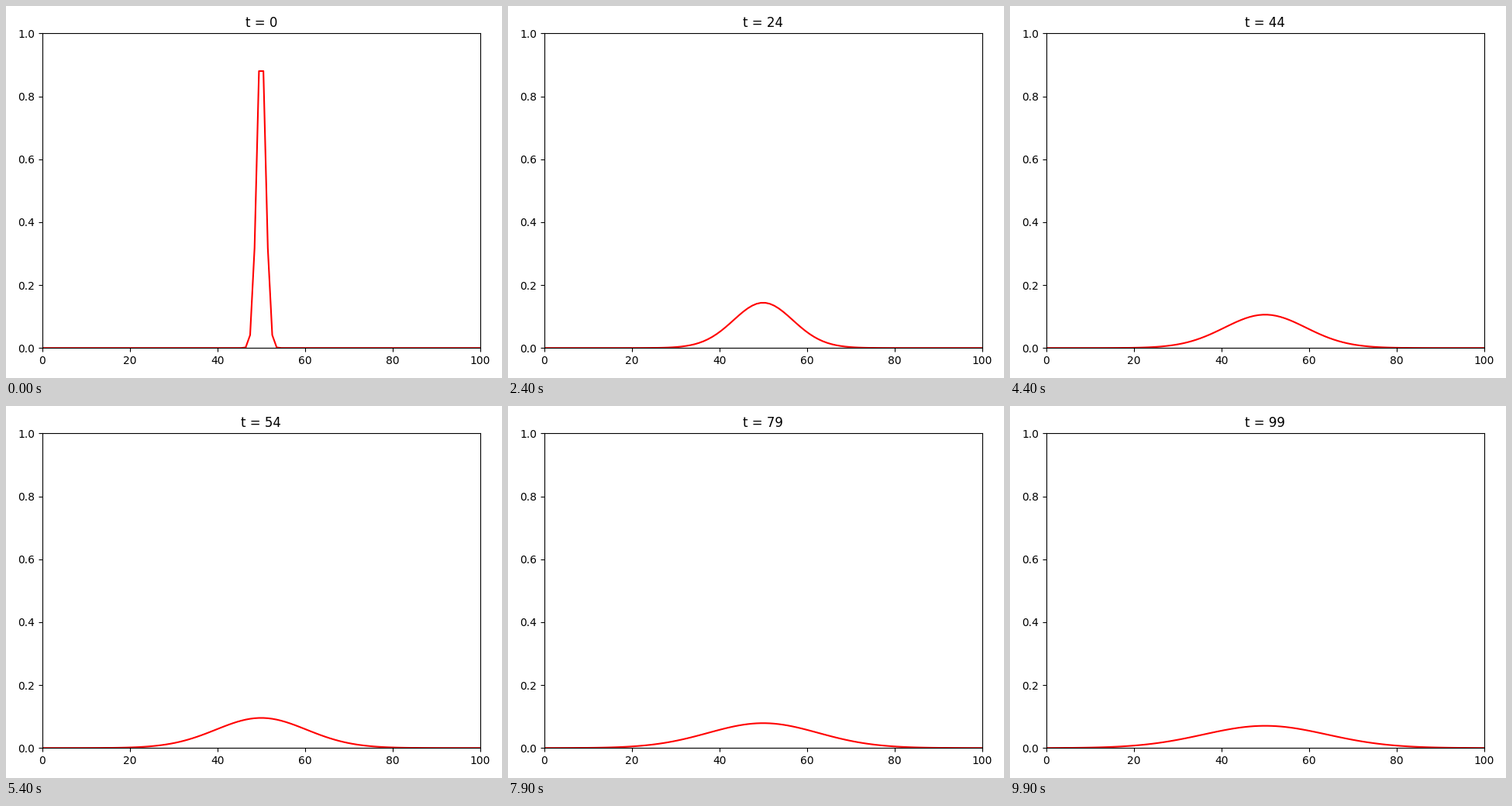
Animation, 640 px wide and 480 px high, one loop 10 s. Source, as a matplotlib script:

```python
import numpy as np
import matplotlib.pyplot as plt
from matplotlib.animation import FuncAnimation

STEPS = 100
N = 100
R = 1.0  # diffusion number D * dt / dx**2
HEIGHT = 480
TOP = 35.33  # pixels above the axes


def implicit_matrix(n, r):
    """Backward Euler matrix for 1D diffusion with fixed ends."""
    a = (1 + 2 * r) * np.eye(n) - r * (np.eye(n, k=1) + np.eye(n, k=-1))
    a[0], a[-1] = 0, 0
    a[0, 0] = a[-1, -1] = 1
    return a


def solve(u, steps):
    step = np.linalg.inv(implicit_matrix(len(u), R))
    states = [u]
    for _ in range(steps - 1):
        states.append(step @ states[-1])
    return states


x = np.linspace(0, 100, N)
states = solve(np.exp(-0.5 * (x - 50) ** 2), STEPS)

plt.rcParams["font.family"] = "DejaVu Sans"
fig, ax = plt.subplots(figsize=(6.4, HEIGHT / 100), dpi=100)
ax.set_xlim(0, 100)
ax.set_ylim(0, 1)
line, = ax.plot(x, states[0], color="red", lw=1.5)
title = ax.set_title("t = 0")
fig.tight_layout()
fig.subplots_adjust(top=1 - TOP / HEIGHT)


def update(t):
    line.set_ydata(states[t])
    title.set_text(f"t = {t}")
    return line, title


anim = FuncAnimation(fig, update, frames=STEPS, interval=100, repeat=True)
plt.show()
```
